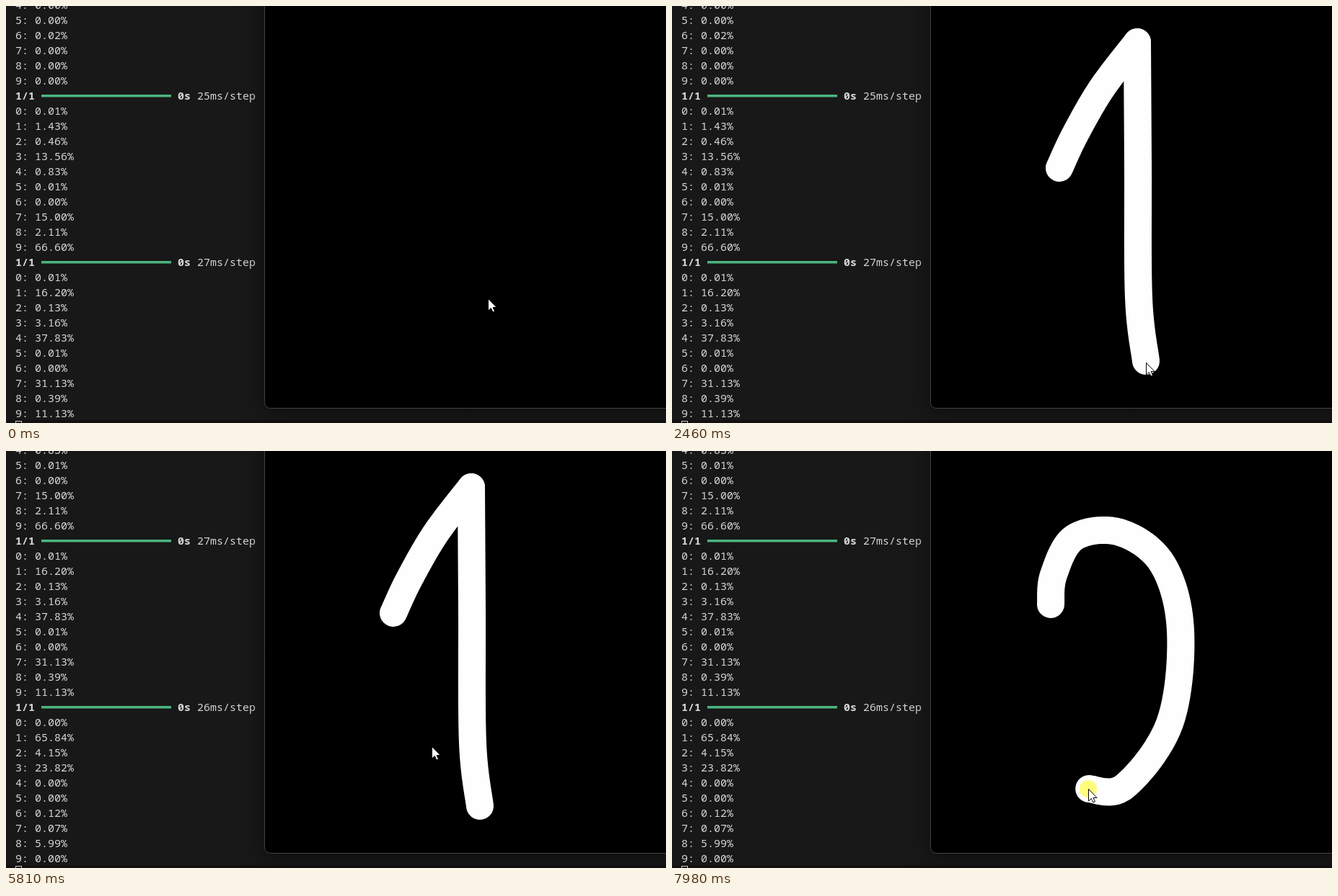
These frames come from a looping animation (915 px wide and 579 px high, 8 s). An HTML page with a canvas:

```html
<!DOCTYPE html>
<html lang="en">
<head>
<meta charset="utf-8">
<title>Digit drawing</title>
<style>
html, body { margin: 0; width: 100%; height: 100%; overflow: hidden; background: #181818; }
canvas { display: block; }
</style>
</head>
<body>
<canvas id="stage" width="915" height="579"></canvas>
<script>
const ctx = document.getElementById('stage').getContext('2d');
const LOOP = 8000, STEP = 70, PEN = 38, PEN_LAG = 0.09;
const SCROLL_AT = 2800, CLEAR_AT = 6230, RELEASE_AT = 2130;
const FONT = '15px "Noto Sans Mono", "DejaVu Sans Mono", monospace';
const CHAR = 9, ROW = 21, ROWS = 28;

// Terminal output: each run is a progress line and the score of every digit
const run = (ms, scores) => [
  { ms },
  ...scores.split(' ').map((score, digit) => ({ text: `${digit}: ${score}%` }))
];
const log = [
  ...run(25, '0.00 0.00 0.00 0.00 0.00 0.00 0.02 0.00 0.00 0.00').slice(5),
  ...run(25, '0.01 1.43 0.46 13.56 0.83 0.01 0.00 15.00 2.11 66.60'),
  ...run(27, '0.01 16.20 0.13 3.16 37.83 0.01 0.00 31.13 0.39 11.13'),
  ...run(26, '0.00 65.84 4.15 23.82 0.00 0.00 0.12 0.07 5.99 0.00')
];

const linear = u => u;
const smooth = u => u * u * (3 - 2 * u);
const easeOut = u => u * (2 - u);
const clamp = (v, lo, hi) => Math.max(lo, Math.min(hi, v));

// Pointer paths through a few points, advancing once per STEP
const move = (from, steps, ease, ...pts) => ({ from, steps, ease, pts });
const draw = (from, steps, ...pts) => ({ from, steps, ease: linear, pts, pen: true });
const phases = [
  move(0, 7, smooth, [668, 406], [537, 225]),
  draw(630, 6, [537, 225], [559, 178], [596, 114], [645, 50]),
  draw(1290, 8, [645, 50], [646, 220], [647, 405], [657, 493]),
  move(2390, 3, linear, [657, 493], [657, 500]),
  move(3600, 11, linear, [657, 500], [630, 465], [390, 418], [210, 414], [118, 418]),
  move(4370, 12, linear, [118, 418], [50, 398], [160, 404], [515, 409]),
  move(5200, 4, easeOut, [515, 409], [591, 413]),
  move(5740, 13, smooth, [591, 413], [525, 214]),
  draw(6860, 16, [525, 213], [529, 172], [558, 120], [621, 113], [680, 157],
    [705, 250], [690, 378], [627, 466], [577, 469])
];

// Catmull-Rom spline through evenly timed points
function spline(pts, u) {
  const last = pts.length - 1;
  const i = Math.min(last - 1, Math.floor(u * last)), f = u * last - i;
  if (last === 1) return pts[0].map((v, k) => v + (pts[1][k] - v) * f);
  const [a, b, c, d] = [-1, 0, 1, 2].map(k => pts[clamp(i + k, 0, last)]);
  return b.map((v, k) => v + 0.5 * f * (c[k] - a[k]
    + f * (2 * a[k] - 5 * v + 4 * c[k] - d[k] + f * (3 * (v - c[k]) + d[k] - a[k]))));
}

function progress(phase, t, lag = 0) {
  return clamp((Math.floor((t - phase.from) / STEP) - lag) / phase.steps, 0, 1);
}

function pointerAt(t) {
  const phase = phases.filter(p => p.from <= t).pop();
  return spline(phase.pts, phase.ease(progress(phase, t)));
}

function drawTerminal(t) {
  ctx.fillStyle = '#181818';
  ctx.fillRect(0, 0, 915, 579);
  const top = t < SCROLL_AT ? 0 : 11;
  const write = (text, col, y, weight) => {
    ctx.font = `${weight} ${FONT}`;
    ctx.fillText(text, 13 + col * CHAR, y);
  };
  log.slice(top, top + ROWS).forEach(({ text, ms }, i) => {
    const y = 4 + ROW * i;
    ctx.fillStyle = '#d6d6d6';
    if (text) {
      write(text, 0, y, 500);
      return;
    }
    write('1/1', 0, y, 700);
    write('0s', 25, y, 700);
    write(`${ms}ms/step`, 28, y, 500);
    ctx.fillStyle = '#4bb47e';
    ctx.fillRect(13 + 4 * CHAR, y - 7, 20 * CHAR, 3.5);
  });
  ctx.fillStyle = '#141012';
  ctx.fillRect(0, 575, 915, 4);
  ctx.strokeStyle = '#cccccc';
  ctx.lineWidth = 1;
  ctx.strokeRect(13.5, 576.5, 8, 14);
}

function drawWindow() {
  ctx.save();
  ctx.shadowColor = 'rgba(0,0,0,0.45)';
  ctx.shadowBlur = 32;
  ctx.shadowOffsetY = 6;
  ctx.fillStyle = '#000';
  ctx.beginPath();
  ctx.roundRect(358.5, -30.5, 600, 589, 8);
  ctx.fill();
  ctx.restore();
  ctx.strokeStyle = '#424242';
  ctx.lineWidth = 1;
  ctx.stroke();
}

function drawInk(t) {
  ctx.save();
  ctx.strokeStyle = '#fefefe';
  ctx.lineWidth = PEN;
  ctx.lineCap = ctx.lineJoin = 'round';
  for (const p of phases) {
    const cleared = p.from < CLEAR_AT && t >= CLEAR_AT;
    if (!p.pen || t < p.from || cleared) continue;
    const end = progress(p, t, PEN_LAG);
    ctx.beginPath();
    ctx.moveTo(...p.pts[0]);
    for (let u = 0; u < end; u += 0.01) ctx.lineTo(...spline(p.pts, u));
    ctx.lineTo(...spline(p.pts, end));
    ctx.stroke();
  }
  ctx.restore();
}

const arrow = new Path2D('M0 0V16.5L3.8 13L6.4 18.5L9 17.4L6.6 12H11.6Z');
const beam = new Path2D('M-4 -8.5H-1L0 -7.5L1 -8.5H4M0 -7.5V7.5M-4 8.5H-1L0 7.5L1 8.5H4');

function drawPointer(t) {
  const [x, y] = pointerAt(t);
  const pressed = phases.some(p => p.pen && t >= p.from) && (t < RELEASE_AT || t >= phases.at(-1).from);
  if (pressed) {
    ctx.fillStyle = 'rgba(255,252,0,0.52)';
    ctx.beginPath();
    ctx.arc(x, y, 12, 0, Math.PI * 2);
    ctx.fill();
  }
  ctx.save();
  ctx.translate(Math.round(x) + 0.5, Math.round(y) + 0.5);
  ctx.lineWidth = 1;
  if (x < 358) {
    ctx.strokeStyle = '#e8e8e8';
    ctx.stroke(beam);
  } else {
    ctx.fillStyle = '#fff';
    ctx.strokeStyle = '#000';
    ctx.fill(arrow);
    ctx.stroke(arrow);
  }
  ctx.restore();
}

const start = performance.now();
function render() {
  const t = (performance.now() - start) % LOOP;
  drawTerminal(t);
  drawWindow();
  drawInk(t);
  drawPointer(t);
  requestAnimationFrame(render);
}
render();
</script>
</body>
</html>
```
